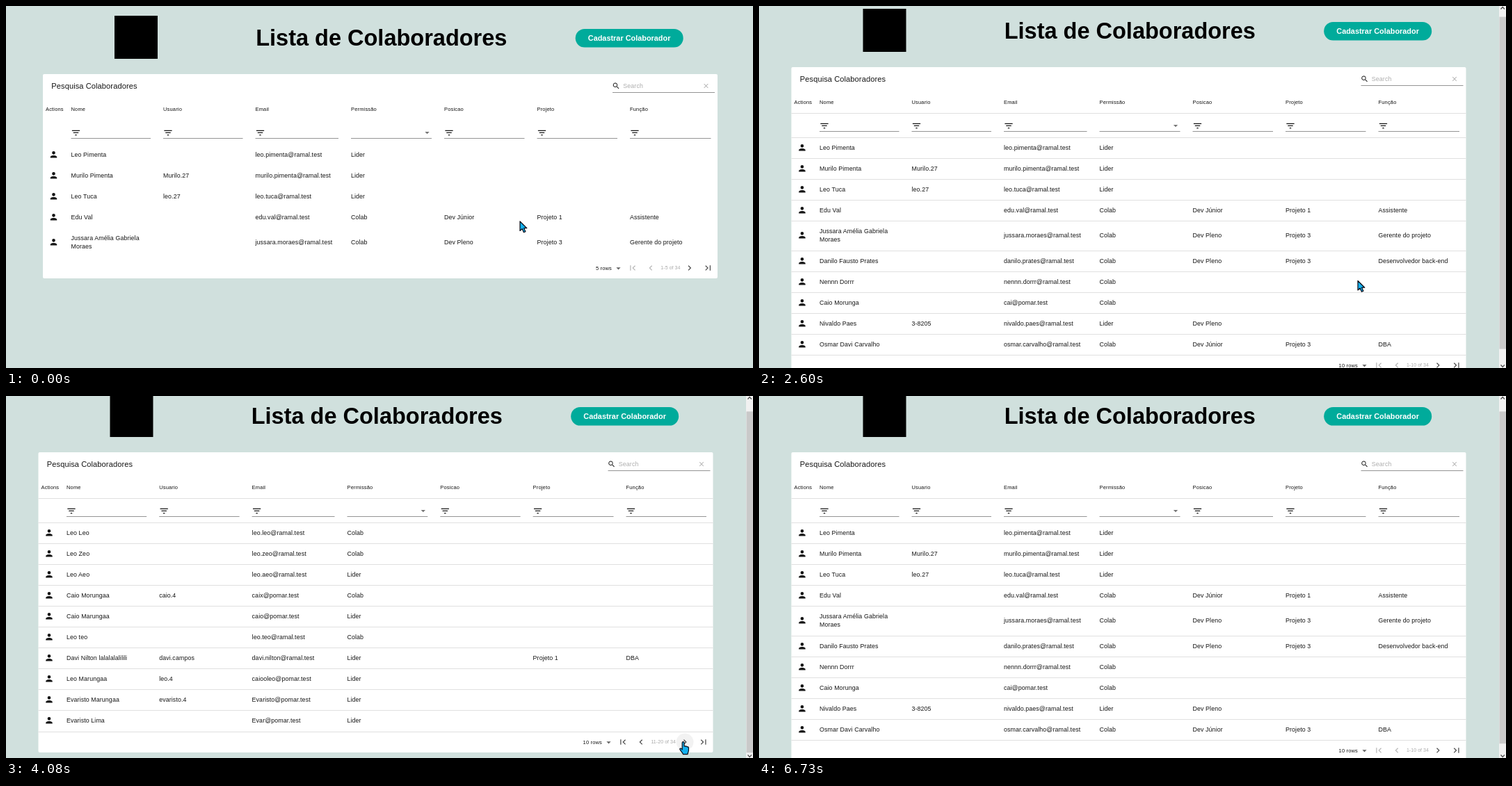
An HTML page for the animation above (7.6 s loop, 1074 by 521 pixels).

```html
<!DOCTYPE html>
<html lang="pt-BR">
<head>
<meta charset="utf-8">
<title>Lista de Colaboradores</title>
<style>
  html, body { margin: 0; width: 100%; height: 100%; overflow: hidden; background: #d0e0dd; }
  svg { display: block; width: 1074px; height: 521px; }
  text { font-family: "Liberation Sans", Arial, sans-serif; white-space: pre; fill: #161616; }
  .cell { font-size: 8.85px; letter-spacing: .1px; }
  .head { font-size: 7.5px; letter-spacing: .16px; }
  .range { font-size: 7px; letter-spacing: .06px; fill: #a9a9a9; text-anchor: end; }
  .end { text-anchor: end; }
  .mid { text-anchor: middle; }
  .h1 { font-size: 32.5px; font-weight: bold; fill: #000; }
  .h2 { font-size: 11.1px; letter-spacing: .08px; }
  .btn { font-size: 10.9px; font-weight: bold; fill: #fff; }
  .tip text { font-size: 5.6px; font-weight: bold; fill: #fff; }
  #menu rect.paper { filter: drop-shadow(0 2px 2.5px rgba(0,0,0,.4)); }
</style>
</head>
<body>
<svg id="stage" viewBox="0 0 1074 521"></svg>
<script>
const LOOP = 7600;
const ROW = 30.05, LINE = 12.5, RIGHT = 1007;

// 24-unit icon outlines
const ICON = {
  filter: 'M10 18h4v-2h-4zM3 6v2h18V6zM6 13h12v-2H6z',
  drop: 'M7 10l5 5 5-5z',
  person: 'M12 12a4 4 0 1 0 0-8 4 4 0 0 0 0 8zM12 14c-2.67 0-8 1.34-8 4v2h16v-2c0-2.66-5.33-4-8-4z',
  search: 'M15.5 14h-.8l-.3-.3A6.5 6.5 0 1 0 13.7 14.4l.3.3v.8l5 5 1.5-1.5zM9.5 14a4.5 4.5 0 1 1 0-9 4.5 4.5 0 0 1 0 9z',
  clear: 'M19 6.4L17.6 5 12 10.6 6.4 5 5 6.4 10.6 12 5 17.6 6.4 19 12 13.4 17.6 19 19 17.6 13.4 12z',
  prev: 'M15.4 7.4L14 6l-6 6 6 6 1.4-1.4L10.8 12z',
  next: 'M10 6L8.6 7.4l4.6 4.6-4.6 4.6L10 18l6-6z',
  first: 'M18.4 16.6L13.8 12l4.6-4.6L17 6l-6 6 6 6zM6 6h2v12H6z',
  last: 'M5.6 7.4l4.6 4.6-4.6 4.6L7 18l6-6-6-6zM16 6h2v12h-2z'
};

const TITLES = ['Nome', 'Usuario', 'Email', 'Permissão', 'Posicao', 'Projeto', 'Função'];

// name|user|email|role|position|project|function; "/" breaks a line, ~ and ^ are mail hosts
const PAGE1 = `Leo Pimenta||leo.pimenta~|Lider
Murilo Pimenta|Murilo.27|murilo.pimenta~|Lider
Leo Tuca|leo.27|leo.tuca~|Lider
Edu Val||edu.val~|Colab|Dev Júnior|Projeto 1|Assistente
Jussara Amélia Gabriela/Moraes||jussara.moraes~|Colab|Dev Pleno|Projeto 3|Gerente do projeto
Danilo Fausto Prates||danilo.prates~|Colab|Dev Pleno|Projeto 3|Desenvolvedor back-end
Nennn Dorrr||nennn.dorrr~|Colab
Caio Morunga||cai^|Colab
Nivaldo Paes|3-8205|nivaldo.paes~|Lider|Dev Pleno
Osmar Davi Carvalho||osmar.carvalho~|Colab|Dev Júnior|Projeto 3|DBA`;

const PAGE2 = `Leo Leo||leo.leo~|Colab
Leo Zeo||leo.zeo~|Colab
Leo Aeo||leo.aeo~|Lider
Caio Morungaa|caio.4|caix^|Colab
Caio Marungaa||caio^|Lider
Leo teo||leo.teo~|Colab
Davi Nilton lalalalalilili|davi.campos|davi.nilton~|Lider||Projeto 1|DBA
Leo Marungaa|leo.4|caiooleo^|Lider
Evaristo Marungaa|evaristo.4|Evaristo^|Lider
Evaristo Lima||Evar^|Lider`;

const PAGE3 = `Frederico Lima|frederico.4|fre.lima^|Colab
Iara Telma Sônia Lopes|iara.lopes|iara.lopes~|Admin|Dev Sênior|Projeto 1|Gerente do projeto
Leandro Ivan Teixeira de/Rocha|leandro.27|leandroitrocha^|Lider|Dev Júnior
Rudi Ivan|rudi.58|rudiiv^|Lider|Dev Sênior
Peixoto Barreto|peixoto.36|pei^|Lider|Dev Sênior
Ivan Otávio Machado||machado^|Colab|Dev Pleno
Tales Bonfim||tales.bonfs^|Colab|Dev Júnior
Ivan Élio||ivanElio^|Colab|Dev Júnior
Gilson Lima||gilson^|Colab|Dev Júnior
Nilo Régis||nilo.regis~|Colab|DBA|Projeto 1|2`;

const COLS1 = [87, 219.5, 352, 489.5, 623.5, 757, 890.5];
const COLS2 = [87, 220.2, 353.6, 490.5, 624.3, 757.6, 891.5];
const COLS3 = [87, 219.5, 352, 490.5, 624.3, 757.6, 891.5];

const text = (x, y, s, cls = 'cell') => `<text x="${x}" y="${y}" class="${cls}">${s}</text>`;
const rect = (x, y, w, h, fill, extra = '') =>
  `<rect x="${x}" y="${y}" width="${w}" height="${h}" fill="${fill}" ${extra}/>`;
const icon = (name, x, y, fill = '#161616', k = .625) =>
  `<path d="${ICON[name]}" fill="${fill}" transform="translate(${x} ${y}) scale(${k}) translate(-12 -12)"/>`;

function footer(y, rows, range, start, canBack) {
  const on = '#4c4c4c', off = '#b8b8b8', back = canBack ? on : off;
  return text(start - 70, y + 2.5, rows + ' rows', 'head end') +
    icon('drop', start - 60.5, y + .5, '#666') +
    icon('first', start - 40, y, back) + icon('prev', start - 14, y, back) +
    text(963, y + 2.3, range, 'range') +
    icon('next', 976.2, y, on) + icon('last', 1002.8, y, on);
}

function table(id, data, cols, lined, rows, range, start, canBack) {
  const line = y => lined ? rect(46.5, Math.round(y), 970, 1, '#e0e0e0') : '';
  let out = '', y = 199;
  out += text(50.5, 151, 'Actions', 'head') + line(164) + line(199);
  cols.forEach((x, i) => {
    const end = i < 6 ? cols[i + 1] - 18 : RIGHT;
    out += text(x, 151, TITLES[i], 'head') + rect(x, 190, end - x, 1, '#949494');
    out += i === 3 ? icon('drop', end - 6.5, 182.3, '#757575') : icon('filter', x + 7, 182.4);
  });
  for (const row of data) {
    const cells = row.replace('~', '@ramal.test').replace('^', '@pomar.test').split('|');
    const names = cells[0].split('/');
    const h = ROW + (names.length - 1) * LINE;
    const base = Math.round(y + h / 2 + 3);
    out += icon('person', 62, base - 3.3, '#161616', .59);
    names.forEach((s, i) => out += text(cols[0], base + (i - (names.length - 1) / 2) * LINE, s));
    cells.slice(1).forEach((s, i) => { if (s) out += text(cols[i + 1], base, s); });
    y += h;
    out += line(y);
  }
  const bottom = Math.round(y) + 30;
  return `<g id="${id}">` + rect(46.5, 98, 970, bottom - 98, '#fff', 'rx="2"') + out +
    footer(bottom - 15, rows, range, start, canBack) + '</g>';
}

function tip(id, label, w) {
  return `<g id="${id}" class="tip">` + rect(-w / 2, -6.5, w, 13, '#616161', 'rx="2" opacity=".92"') +
    text(0, 2.1, label, 'mid') + '</g>';
}

const first = PAGE1.split('\n');
document.getElementById('stage').innerHTML =
  '<g id="page">' +
    rect(149.5, 14, 62, 62, '#000') +
    text(352.7, 57, 'Lista de Colaboradores', 'h1') +
    rect(812.2, 33, 155, 26.5, '#00ab9b', 'rx="13.2"') +
    text(889.6, 50, 'Cadastrar Colaborador', 'btn mid') +
    table('short', first.slice(0, 5), COLS1, false, 5, '1-5 of 34', 934.5, false) +
    table('page1', first, COLS1, true, 10, '1-10 of 34', 931, false) +
    table('page2', PAGE2.split('\n'), COLS2, true, 10, '11-20 of 34', 927, true) +
    table('page3', PAGE3.split('\n'), COLS3, true, 10, '21-30 of 34', 927, true) +
    text(58.8, 118.5, 'Pesquisa Colaboradores', 'h2') +
    icon('search', 870.7, 115, '#222', .5) +
    '<g opacity=".35">' + text(880.8, 118.3, 'Search') + '</g>' +
    icon('clear', 1000, 115, '#b5b5b5', .45) +
    rect(865.5, 124, 147, 1, '#949494') +
  '</g>' +
  rect(738, 319, 65, 1, '#e0e0e0', 'id="trail1"') +
  rect(792, 361, 105, 1, '#e0e0e0', 'id="trail2"') +
  '<g id="bar">' + rect(1064, 0, 10, 521, '#f1f1f1') +
    rect(1064.5, 0, 9.5, 478, '#c9c9c9', 'id="thumb"') +
    '<path d="M1066.5 4.5l2.7-3 2.7 3M1066.5 516.5l2.7 3 2.7-3" fill="none" stroke="#505050" stroke-width="1.3"/></g>' +
  '<circle id="hover" r="12.5" fill="#000" opacity=".05"/>' +
  '<g id="menu">' + rect(841, 363, 47, 69, '#fff', 'class="paper" rx="2.5"') +
    rect(841, 367, 47, 20, '#ebebeb') + rect(841, 387, 47, 20, '#f5f5f5', 'id="option"') +
    text(849.7, 380, '5') + text(849.7, 400, '10') + text(849.7, 420, '20') + '</g>' +
  tip('tipNext', 'Next Page', 35) + tip('tipPrev', 'Previous Page', 46) + tip('tipFirst', 'First Page', 36) +
  '<circle id="ring" r="9" fill="#fff" fill-opacity=".6" stroke="#111" stroke-width="1.3"/>' +
  '<g id="cursor" fill="#12b0ee" stroke="#0a0a14" stroke-width="1.2" stroke-linejoin="round">' +
    '<path id="arrow" d="M.5.5V14l3.1-2.9 2.3 5.2 2.5-1.1-2.3-5h4.2z"/>' +
    '<path id="hand" d="M-1.4 1.5a1.4 1.4 0 0 1 2.8 0v5c.6-.6 2-.5 2.3.4.7-.6 2-.3 2.2.6.9-.5 1.9-.1 1.9 1v4.2c0 2-1.4 3-1.4 5.3h-6.6c0-2-3.4-4.4-4.5-7.2-.4-1.1 1-1.9 1.9-1l1.4 1.4z"/></g>';

const el = {};
document.querySelectorAll('[id]').forEach(n => el[n.id] = n);

const ramp = (t, a, b) => Math.min(1, Math.max(0, (t - a) / (b - a)));
const ease = (t, a, b) => { const k = ramp(t, a, b); return k * k * (3 - 2 * k); };
const within = (t, a, b) => t >= a && t < b;
const show = (node, on) => node.style.display = on ? '' : 'none';
const move = (node, x, y, k = 1) => node.setAttribute('transform', `translate(${x} ${y}) scale(${k})`);

// time, x, y of the pointer
const PATH = [
  [0, 738.5, 309.5], [60, 738.5, 309.5], [540, 857, 374], [880, 857, 374], [1180, 858, 405],
  [1470, 857, 394], [2590, 857, 394], [2600, 860.5, 395], [2950, 860.5, 395], [3480, 986, 500],
  [3630, 986, 500], [4150, 973, 497.5], [5180, 973, 497.5], [5650, 891, 502.5],
  [6250, 891, 502.5], [6700, 882, 545]
];

function pointer(t) {
  let i = 0;
  while (i < PATH.length - 2 && t >= PATH[i + 1][0]) i++;
  const [a, x, y] = PATH[i], [b, u, v] = PATH[i + 1], k = ease(t, a, b);
  return [x + (u - x) * k, y + (v - y) * k];
}

function scrollAt(t) {
  if (t < 1870) return 0;
  if (t < 3690) return Math.round(10 + 19 * ease(t, 2850, 3050));
  return 17;
}

function setTip(node, t, x, y, inA, inB, outA, outB) {
  const k = ease(t, inA, inB) * (1 - ease(t, outA, outB));
  show(node, k > 0);
  node.setAttribute('opacity', k);
  move(node, x, y, .75 + .25 * k);
}

function render(t) {
  const scroll = scrollAt(t), wide = t < 1870;
  move(el.page, wide ? 6.5 : 0, -scroll);
  show(el.short, wide);
  show(el.page1, within(t, 1870, 3690) || t >= 6190);
  show(el.page2, within(t, 3690, 5050));
  show(el.page3, within(t, 5050, 6190));
  show(el.trail1, wide && t >= 240);
  show(el.trail2, wide && t >= 560);

  show(el.bar, !wide);
  el.thumb.setAttribute('y', 6 + scroll * .96);
  el.thumb.setAttribute('height', within(t, 3690, 5050) ? 491 : 478);

  const open = ease(t, 570, 810), fade = open * (1 - ramp(t, 1870, 2080));
  show(el.menu, fade > 0);
  el.menu.setAttribute('opacity', fade);
  el.menu.setAttribute('transform',
    `translate(864 377) scale(${.75 + .25 * open} ${.56 + .44 * open}) translate(-864 -377)`);
  show(el.option, t >= 1320);

  const low = t >= 5050;
  show(el.hover, within(t, 3420, 5230));
  move(el.hover, 976, low ? 511 : 498);

  setTip(el.tipNext, t, 976.5, low ? 483.5 : 470.5, 4200, 4410, 5200, 5400);
  setTip(el.tipPrev, t, 913.5, 483.5, 5420, 5570, 5630, 5780);
  setTip(el.tipFirst, t, 887, 483.5, 5715, 5890, 6200, 6400);

  const [x, y] = pointer(t);
  const hand = within(t, 480, 2600) || within(t, 3420, 6290);
  move(el.cursor, x, y);
  show(el.hand, hand);
  show(el.arrow, !hand);
  move(el.ring, x + 1, y + .5);
  show(el.ring, within(t, 3630, 3690) || within(t, 4930, 5050) || within(t, 6070, 6190));
}

const begin = performance.now();
function tick() {
  render((performance.now() - begin) % LOOP);
  requestAnimationFrame(tick);
}
tick();
</script>
</body>
</html>
```
